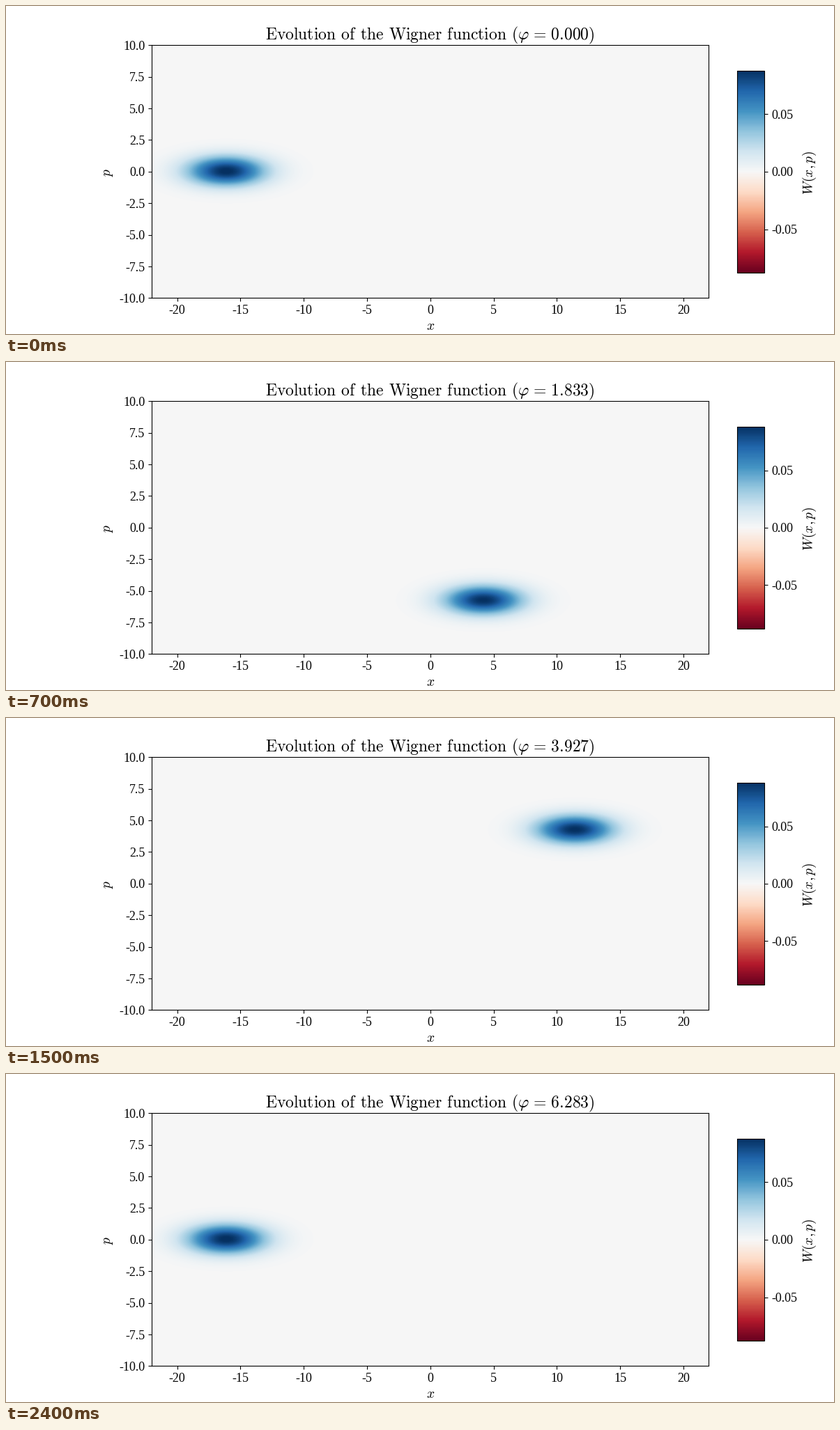
A matplotlib script that plays this animation: 1188 px wide and 471 px high, repeating every 2.5 s.

```python
import numpy as np
import matplotlib.pyplot as plt
from matplotlib.animation import FuncAnimation

W, H, DPI = 1188, 471, 100
STEPS = 24
X0, P0 = 16.1, 5.95          # orbit half axes
SX, SP = 2.206, 0.815        # widths of the Gaussian
PEAK = 1 / (2 * np.pi * SX * SP)

plt.rcParams.update({
    "font.family": "Liberation Serif",
    "mathtext.fontset": "cm",
    "axes.linewidth": 0.8,
    "xtick.labelsize": 13,
    "ytick.labelsize": 13,
})

fig = plt.figure(figsize=((W + 1e-6) / DPI, (H + 1e-6) / DPI), dpi=DPI,
                 facecolor="white")


def add_axes(left, top, right, bottom):
    return fig.add_axes([left / W, 1 - bottom / H,
                         (right - left) / W, (bottom - top) / H])


def put(x, y, s, size, **kw):
    return fig.text(x / W, 1 - y / H, s, fontsize=size, ha="center",
                    va="baseline", rotation_mode="anchor", **kw)


def title(phi):
    gap = r"\hspace{0.40}"
    words = gap.join(["Evolution", "of", "the", "Wigner", "function", "("])
    return (rf"$\mathrm{{{words}}}\varphi\hspace{{0.12}}=\hspace{{0.12}}"
            rf"\mathrm{{{phi:.3f})}}$")


def wigner(x, p, phi):
    dx = (x + X0 * np.cos(phi)) / SX
    dp = (p + P0 * np.sin(phi)) / SP
    return PEAK * np.outer(np.exp(-dp**2 / 2), np.exp(-dx**2 / 2))


def centers(lim, n):
    return (np.arange(n) + 0.5) / n * 2 * lim - lim


# Phase space
ax = add_axes(209.25, 56.2, 1008.45, 419.4)
xs, ps = centers(22, 799), centers(10, 363)
field = ax.imshow(wigner(xs, ps, 0), cmap="RdBu", origin="lower",
                  extent=(-22, 22, -10, 10), aspect="auto",
                  interpolation="nearest")
xt, pt = np.arange(-20, 21, 5), np.arange(-10, 10.1, 2.5)
ax.set_xticks(xt, [f"{v:.0f}" for v in xt])
ax.set_yticks(pt, [f"{v:.1f}" for v in pt])

# Colour bar
cax = add_axes(1048.55, 92.6, 1088.45, 383.2)
bar = fig.colorbar(field, cax=cax, ticks=[-0.05, 0, 0.05],
                   format=lambda v, _: f"{v:.2f}")

heading = put(608.4, 48.7, title(0), 17)
put(609, 465, "$x$", 14)
put(149.8, 238.5, "$p$", 14, rotation=90)
put(1158, 239.5, "$W(x,p)$", 14, rotation=90)

# The colour range follows the largest value on a coarse grid
grid_x, grid_p = np.linspace(-22, 22, 100), np.linspace(-10, 10, 100)


def update(i):
    phi = 2 * np.pi * i / STEPS
    top = wigner(grid_x, grid_p, phi).max()
    field.set_data(wigner(xs, ps, phi))
    field.set_clim(-top, top)
    heading.set_text(title(phi))
    return field, heading


anim = FuncAnimation(fig, update, frames=STEPS + 1, interval=100,
                     init_func=lambda: update(0), repeat=True, repeat_delay=0)
plt.show()
```
